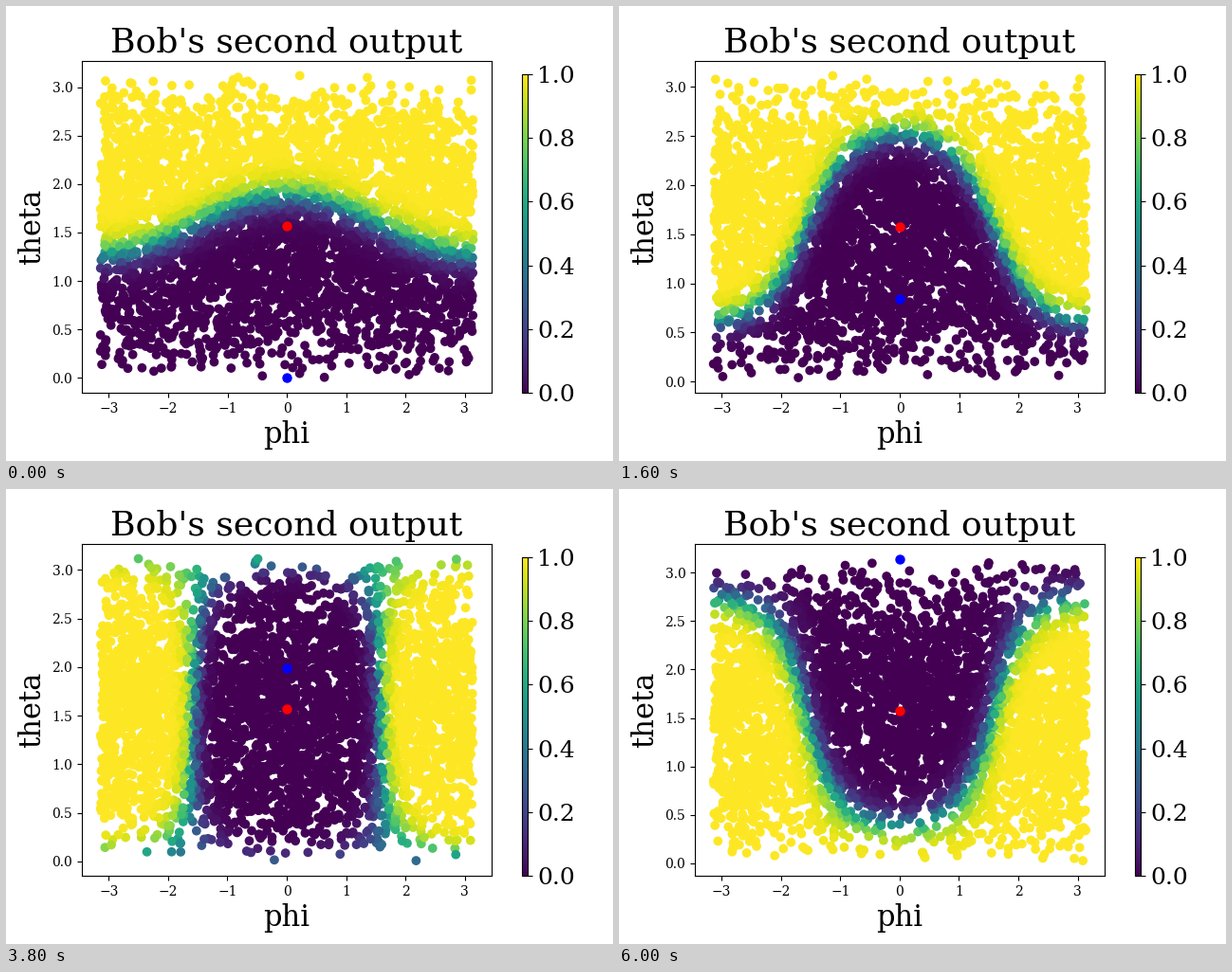
These frames come from a looping animation (640x480 px, 6200 ms). A matplotlib script:

```python
import numpy as np
import matplotlib.pyplot as plt
from matplotlib.animation import FuncAnimation
from matplotlib.cm import ScalarMappable
from matplotlib.colors import Normalize

plt.rcParams["font.family"] = "DejaVu Serif"

FRAMES, INTERVAL = 31, 200
POINTS = 4000
PI = np.pi


def sample_sphere(step):
    """Uniform points on the sphere as phi, theta."""
    rng = np.random.default_rng(step)
    phi = rng.uniform(-PI, PI, POINTS)
    theta = np.arccos(rng.uniform(-1, 1, POINTS))
    return phi, theta


def output(phi, theta, u):
    """Smooth step across a plane through the centre that tilts with u in 0..1."""
    tilt = 0.3 + 2.52 * u - 0.85 * u**2 + 0.04 * np.sin(2 * PI * u)
    steep = 13 + 3 * np.sin(PI * u)
    side = (np.sin(tilt) * np.sin(theta) * np.cos(phi)
            + np.cos(tilt) * np.cos(theta))
    return 1 / (1 + np.exp(steep * side))


def limits(values):
    """Data range with a 5 % margin on both ends."""
    low, high = np.min(values), np.max(values)
    margin = 0.05 * (high - low)
    return low - margin, high + margin


fig = plt.figure(figsize=(6.4, 4.8), dpi=100)
ax = fig.add_axes([0.125, 0.15, 0.675, 0.73])
ax.set_title("Bob's second output", fontsize=26)
ax.set_xlabel("phi", fontsize=22)
ax.set_ylabel("theta", fontsize=22)

norm = Normalize(0, 1)
cax = fig.add_axes([0.85, 0.15, 0.01, 0.7])
bar = fig.colorbar(ScalarMappable(norm, "viridis"), cax=cax)
bar.ax.tick_params(labelsize=18)

cloud = ax.scatter([0], [0], c=[0], cmap="viridis", norm=norm)
blue = ax.scatter([0], [0], s=42, c="blue", zorder=2)
red = ax.scatter([0], [PI / 2], s=42, c="red", zorder=3)


def update(step):
    u = step / (FRAMES - 1)
    phi, theta = sample_sphere(step)
    cloud.set_offsets(np.column_stack([phi, theta]))
    cloud.set_array(output(phi, theta, u))
    blue.set_offsets([[0, PI * u]])
    ax.set_xlim(limits(phi))
    ax.set_ylim(limits(np.append(theta, PI * u)))
    return cloud, blue, red


anim = FuncAnimation(fig, update, frames=FRAMES, interval=INTERVAL,
                     repeat=True, repeat_delay=0, blit=False)
plt.show()
```
